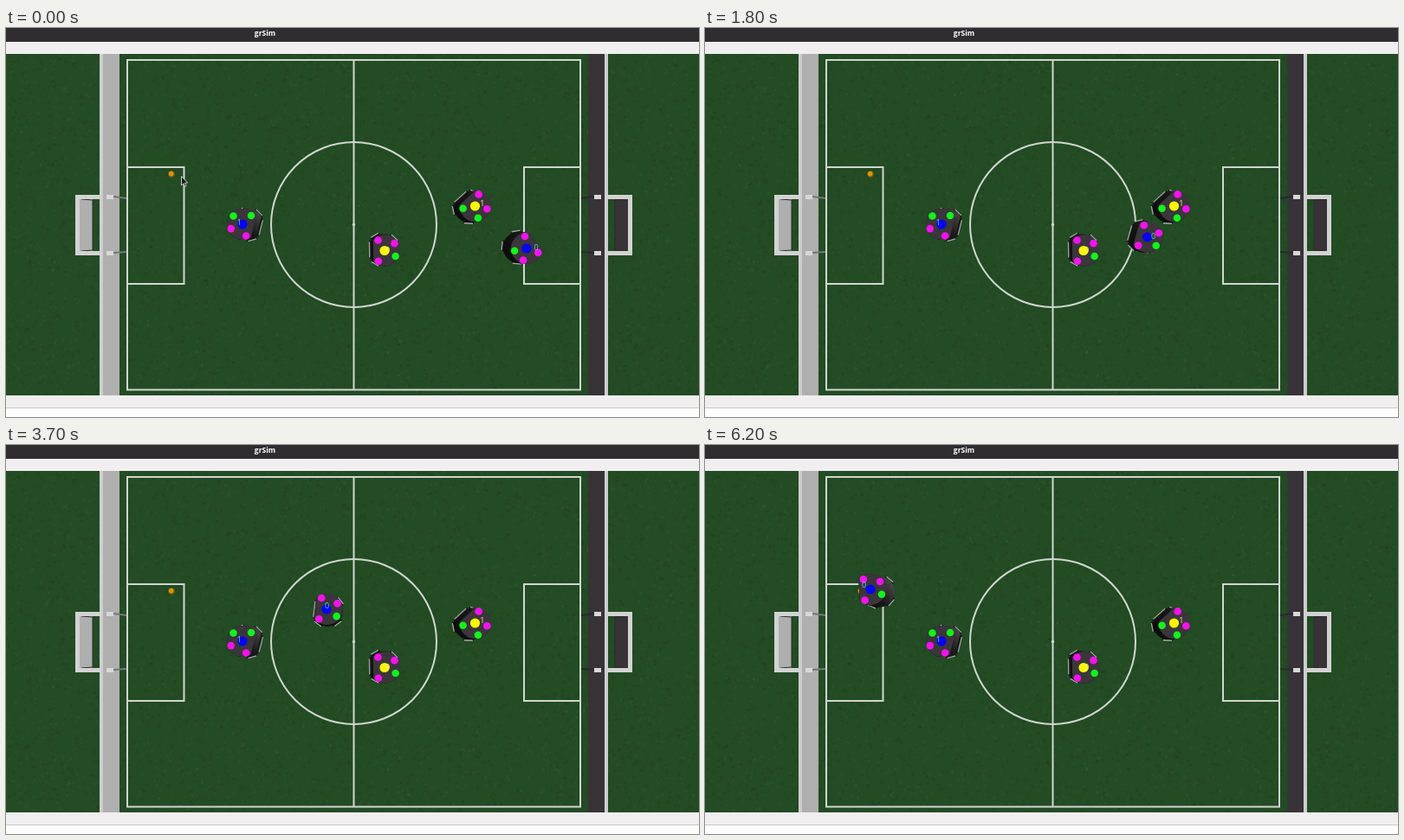
An HTML page with a canvas that plays this animation: 800 px wide and 450 px high, repeating every 6300 ms.

```html
<!DOCTYPE html>
<html>
<head>
<meta charset="utf-8">
<style>
html, body { margin: 0; width: 100%; height: 100%; overflow: hidden; }
canvas { display: block; width: 800px; height: 450px; }
</style>
</head>
<body>
<canvas id="stage" width="800" height="450"></canvas>
<script>
const LOOP = 6300, STEP = 100, RAD = Math.PI / 180;
const PINK = '#f812f0', GREEN = '#10f51c', BLUE = '#0505f0', YELLOW = '#fbf606';
const ctx = document.getElementById('stage').getContext('2d');

// Moving robot: time, x, y, heading in degrees
const route = [
  [0, 601, 255, 321], [1100, 547, 268, 203], [2500, 469, 208, 192], [3700, 370, 190, 187],
  [4500, 308, 173, 187], [5400, 235, 163, 180], [6200, 191, 167, 176]
];

function rect(c, color, x, y, w, h) {
  c.fillStyle = color;
  c.fillRect(x, y, w, h);
}

function dot(c, color, x, y, r) {
  c.fillStyle = color;
  c.beginPath();
  c.arc(x, y, r, 0, 7);
  c.fill();
}

function line(c, color, width, ...points) {
  c.strokeStyle = color;
  c.lineWidth = width;
  c.beginPath();
  for (let i = 0; i < points.length; i += 2) c.lineTo(points[i], points[i + 1]);
  c.stroke();
}

function drawGoal(c, side) {
  c.save();
  if (side > 0) { c.translate(803, 0); c.scale(-1, 1); }
  const wall = side > 0 ? '#373337' : '#afafaf';
  rect(c, wall, 112, 30, 19, 395);
  rect(c, '#cdcdcd', 108, 30, 4, 395);
  rect(c, wall, 85, 198, 15, 60);
  line(c, '#2a2c2a', 1, 87, 198, 100, 199, 100, 257, 87, 258);
  for (const y of [193, 258]) {
    rect(c, '#d2d2d2', 80, y, 30, 5);
    rect(c, '#d8d8d8', 116, y, 8, 5);
    line(c, side > 0 ? '#2b292b' : '#777', 2, 124, y + 2, 139, y < 200 ? 197 : 259);
  }
  rect(c, '#d2d2d2', 80, 193, 5, 70);
  c.restore();
}

function buildField() {
  const canvas = document.createElement('canvas');
  canvas.width = 800;
  canvas.height = 450;
  const c = canvas.getContext('2d');
  rect(c, '#fefdfe', 0, 0, 800, 450);
  rect(c, '#302d31', 0, 0, 800, 16);
  rect(c, '#f1eef0', 0, 16, 800, 14);
  rect(c, '#f0eeef', 0, 425, 800, 14);
  rect(c, '#cbc8ca', 0, 439, 800, 1);
  rect(c, '#234b24', 0, 30, 800, 395);

  let seed = 7;
  const random = () => (seed = seed * 16807 % 2147483647) / 2147483647;
  for (let i = 0; i < 5000; i++) {
    const tint = i % 2 ? 'rgba(0,0,0,.05)' : 'rgba(120,170,100,.05)';
    rect(c, tint, random() * 797, 30 + random() * 392, 3, 3);
  }

  c.strokeStyle = '#d0d6d0';
  c.lineWidth = 2;
  c.strokeRect(140, 37, 523, 381.5);
  c.strokeRect(140, 161, 65.5, 135);
  c.strokeRect(598, 161, 65, 135);
  line(c, '#d0d6d0', 2, 401.5, 37, 401.5, 418);
  c.beginPath();
  c.arc(401.5, 227.5, 95.5, 0, 7);
  c.stroke();
  dot(c, '#d0d6d0', 401.5, 227.5, 1.7);
  drawGoal(c, -1);
  drawGoal(c, 1);

  c.fillStyle = '#fff';
  c.font = 'bold 8.5px "Open Sans", sans-serif';
  c.textAlign = 'center';
  c.fillText('grSim', 299, 9);
  return canvas;
}

// Monotone cubic through one column of the route
function sample(t, col) {
  const slope = i => (route[i + 1][col] - route[i][col]) / (route[i + 1][0] - route[i][0]);
  const last = route.length - 1;
  const tangent = i => {
    if (i === 0) return 0;
    if (i === last) return slope(last - 1);
    const a = slope(i - 1), b = slope(i);
    return a * b > 0 ? 2 * a * b / (a + b) : 0;
  };
  let i = 0;
  while (i < last - 1 && t > route[i + 1][0]) i++;
  const span = route[i + 1][0] - route[i][0];
  const u = Math.min(1, (t - route[i][0]) / span), v = 1 - u;
  return route[i][col] * v * v * (1 + 2 * u) + route[i + 1][col] * u * u * (3 - 2 * u)
    + span * (tangent(i) * u * v * v - tangent(i + 1) * u * u * v);
}

// Disc with a flat front at the given heading
function plate(x, y, heading, color) {
  const cut = Math.acos(13 / 18);
  ctx.fillStyle = color;
  ctx.beginPath();
  ctx.arc(x, y, 18, heading + cut, heading - cut + 2 * Math.PI);
  ctx.fill();
}

function drawRobot(x, y, degrees, id, team) {
  const heading = degrees * RAD;
  // The overhead camera shows the base shifted toward the middle of the field
  const dx = (401 - x) * 0.047, dy = (228 - y) * 0.047;

  ctx.save();
  ctx.translate(x + dx, y + dy);
  ctx.rotate(heading);
  for (const angle of [60, 135, 225, 300]) {
    ctx.save();
    ctx.rotate(angle * RAD);
    line(ctx, '#111', 4, 17, -6, 17, 6);
    line(ctx, '#a5aba5', 1.3, 19, -5, 19, 5);
    ctx.restore();
  }
  line(ctx, '#151515', 3, 14, -11, 14, 11);
  line(ctx, '#a0a5a0', 1.3, 15.7, -9, 15.7, 9);
  ctx.restore();

  const shade = ctx.createLinearGradient(x - 12, y + 16, x + 24, y - 10);
  shade.addColorStop(0, '#0d0d0d');
  shade.addColorStop(0.5, '#191819');
  shade.addColorStop(1, '#4a4a4a');
  for (let k = 1; k > 0; k -= 0.1) plate(x + dx * k, y + dy * k, heading, shade);
  plate(x, y, heading, '#3b363b');

  const colors = id ? [PINK, GREEN, PINK, GREEN] : [PINK, PINK, PINK, GREEN];
  [59, -59, 145, 208].forEach((angle, i) => {
    const a = heading + angle * RAD;
    dot(ctx, colors[i], x + 14.2 * Math.cos(a), y + 14.2 * Math.sin(a), 4.3);
  });
  dot(ctx, team, x, y, 5.6);

  ctx.fillStyle = team === BLUE ? '#5cd2ee' : '#f4f08a';
  ctx.font = '9px "Open Sans", sans-serif';
  ctx.textAlign = 'center';
  ctx.fillText(id, x + (x - 355) * 0.045, y + (y - 275) * 0.05 + 3.3);
}

function drawBall(x, y) {
  dot(ctx, '#805a08', x, y, 3.8);
  dot(ctx, '#d8960f', x - 0.3, y - 0.4, 2.8);
}

function drawCursor(t) {
  if (t > 1200) return;
  const u = Math.max(0, Math.min(1, (t - 700) / 400)), e = u * u * (3 - 2 * u);
  ctx.save();
  ctx.translate(202.5 - 70.5 * e, 171.5 + 208 * e);
  ctx.beginPath();
  for (const [x, y] of [[0, 0], [0, 10.5], [2.4, 8.3], [4, 12], [5.6, 11.2], [4, 7.8], [7, 7.5]]) ctx.lineTo(x, y);
  ctx.closePath();
  ctx.fillStyle = '#171717';
  ctx.fill();
  ctx.strokeStyle = '#d5d9d5';
  ctx.lineWidth = 0.9;
  ctx.stroke();
  ctx.restore();
}

const field = buildField();

function frame(now) {
  const t = Math.floor(now % LOOP / STEP) * STEP;
  const [x, y, heading] = [1, 2, 3].map(col => sample(t, col));
  ctx.drawImage(field, 0, 0);
  drawBall(Math.min(191, x - 11), 169);
  drawRobot(273, 227, 14, 1, BLUE);
  drawRobot(437, 257.5, 179, 0, YELLOW);
  drawRobot(541.5, 206, 228, 1, YELLOW);
  drawRobot(x, y, heading, 0, BLUE);
  drawCursor(t);
  requestAnimationFrame(frame);
}
requestAnimationFrame(frame);
</script>
</body>
</html>
```
